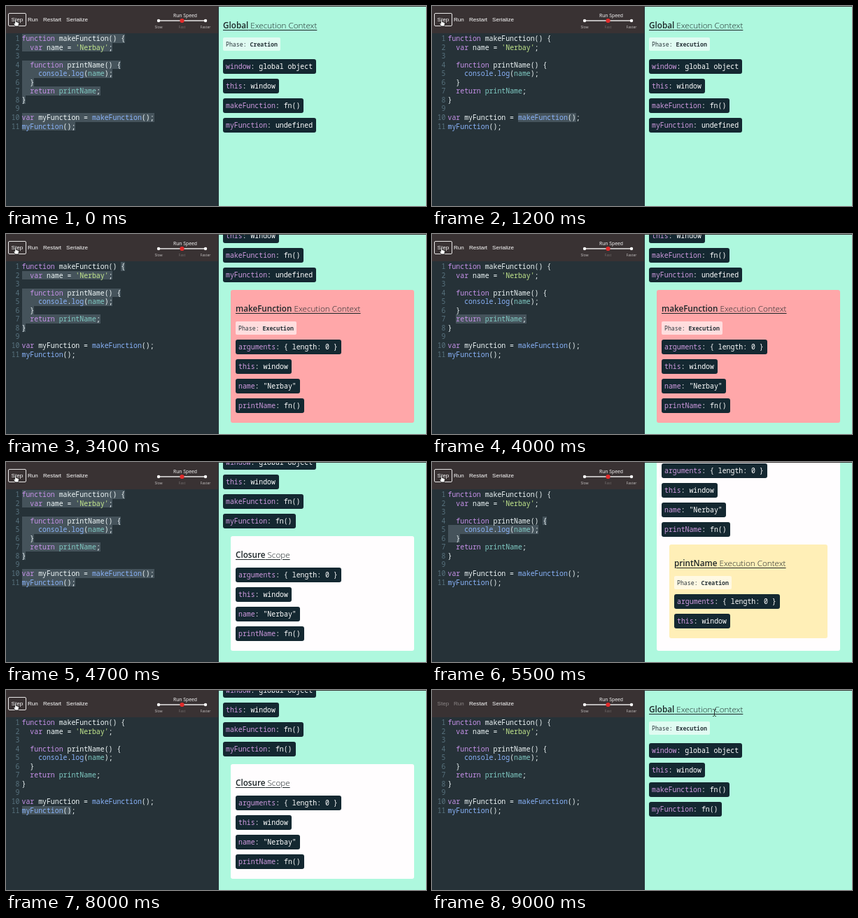
Animation, 600 px wide and 286 px high, one loop 9100 ms. Source, as an HTML page:

```html
<!DOCTYPE html>
<html lang="en">
<head>
<meta charset="utf-8">
<title>Closure visualizer</title>
<style>
html, body { margin: 0; width: 100%; height: 100%; overflow: hidden; }
#stage { position: relative; width: 600px; height: 286px; overflow: hidden; background: #263238; }
#stage div, #stage svg { position: absolute; }
#bar { left: 0; top: 0; width: 303px; height: 39px; background: #393233; color: #fff; font: 8.1px/18px "Liberation Sans", Arial, sans-serif; }
#bar span { position: absolute; top: 10.5px; white-space: nowrap; }
#ring { left: 3px; top: 10px; width: 24px; height: 17px; border: 1px solid #e8e6e6; border-radius: 2px; }
.done #ring { display: none; }
.done .off { color: #8b8686; }
#bar svg { left: 200px; top: 0; }
#code { left: 0; top: 40px; width: 303px; height: 245px; font: 500 9.86px/12.55px "Noto Sans Mono", "DejaVu Sans Mono", monospace; color: #eef6f7; }
#code .line, #code .num { white-space: pre; height: 12.55px; }
#code .line { left: 22.5px; }
#code .num { right: 283.5px; color: #58727e; }
#marks { left: 22.5px; top: 0; }
#marks div { height: 12.6px; background: #45535b; }
.k { color: #c792ea; } .s { color: #c3e88d; } .f { color: #8ab4fb; } .v { color: #80cbc4; }
#view { left: 303px; top: 0; width: 298px; height: 286px; overflow: hidden; background: #aef8de; clip-path: inset(0 0 0 1px); }
#edge { left: 303px; top: 0; width: 297px; height: 1px; background: #3a3535; }
#view section { display: flow-root; position: relative; padding-bottom: 7.5px; border-radius: 3px; }
#view section.open { padding-bottom: 0; }
#view section section { margin: 11.5px 18px 18px; }
#view .global > section { margin-bottom: 16px; }
#view h1, #view p { position: relative; margin: 0 0 7px 7px; width: max-content; white-space: pre; }
h1 { font: 300 11.7px/21px "Open Sans", "Noto Sans", sans-serif; color: #1c2628; text-decoration: underline; text-decoration-thickness: 1px; text-underline-offset: 2px; }
#view h1 { margin-top: 16px; margin-bottom: 7.5px; }
h1 b { font-weight: 600; }
p { font: 500 9.86px/21px "Noto Sans Mono", "DejaVu Sans Mono", monospace; color: #fff; background: #142831; border-radius: 3px; padding: 0 5px 0 4px; }
p i { font-style: normal; color: #cf9ae0; }
#view p.phase { font-size: 8.22px; line-height: 19px; padding: 0 4px; color: #28343a; background: rgba(255, 255, 255, .62); border-radius: 2px; }
#view .global > h1 { margin-top: 16.5px; }
#view .global > .phase { margin-bottom: 11.5px; }
.make { background: #ffa7a9; }
.closure { background: #fffdfe; }
.print { background: #ffefb7; }
#hand, #beam { left: 0; top: 0; }
</style>
</head>
<body>
<div id="stage">
  <div id="bar">
    <div id="ring"></div>
    <span class="off" style="left:7.5px">Step</span>
    <span class="off" style="left:31px">Run</span>
    <span style="left:53px">Restart</span>
    <span style="left:86px">Serialize</span>
    <svg width="103" height="39" font-family="Open Sans, sans-serif" text-anchor="middle">
      <text x="56" y="15.6" font-size="6.8" font-weight="500" fill="#fff">Run Speed</text>
      <path d="M18 21H85" stroke="#e9e6e6" stroke-width="1.5"/>
      <circle cx="18" cy="21" r="2.2" fill="#fff"/>
      <circle cx="85" cy="21" r="2.2" fill="#fff"/>
      <circle cx="51.5" cy="21" r="3.1" fill="#e02b2b"/>
      <g font-size="5.2" fill="#c4c0c0">
        <text x="18" y="32">Slow</text>
        <text x="51.5" y="32" fill="#746e6e">Fast</text>
        <text x="85" y="32">Faster</text>
      </g>
    </svg>
  </div>
  <div id="code"><div id="marks"></div></div>
  <div id="view"></div>
  <div id="edge"></div>
  <svg id="hand" width="30" height="40">
    <path d="M12.6 25V19.3q.9-1.2 1.8 0V22.6l3.2.8q.9.3.8 1.3l-.6 4.2H13.4L10.8 25.6q.2-1.2 1.8-.6z" fill="#fff" stroke="#111" stroke-width=".7"/>
  </svg>
  <svg id="beam" width="10" height="14">
    <path d="M2.5 1.5Q4.5 1.5 5 2.5Q5.5 1.5 7.5 1.5M5 2.5V10.5M2.5 11.5Q4.5 11.5 5 10.5Q5.5 11.5 7.5 11.5" fill="none" stroke="#222" stroke-width=".9"/>
  </svg>
</div>
<script>
const LOOP = 9100;
const $ = id => document.getElementById(id);
const NAME = 'Nerbay';

// Token prefix: ~k keyword, ~s string, ~f global, ~v local; | ends a token.
const source = [
  '~kfunction| makeFunction() {',
  `  ~kvar| name = ~s'${NAME}'|;`,
  '',
  '  ~kfunction| printName() {',
  '    ~fconsole|.~flog|(~vname|);',
  '  }',
  '  ~kreturn| ~vprintName|;',
  '}',
  '',
  '~kvar| myFunction = ~fmakeFunction|();',
  '~fmyFunction|();'
];
const plain = source.map(s => s.replace(/~[ksfv]|\|/g, ''));

source.forEach((s, i) => {
  const top = `style="top:${(i * 12.55).toFixed(2)}px"`;
  const html = s.replace(/~([ksfv])([^|]*)\|/g, '<span class="$1">$2</span>');
  $('code').insertAdjacentHTML('beforeend',
    `<div class="num" ${top}>${i + 1}</div><div class="line" ${top}>${html}</div>`);
});

// Highlight ranges: first line, column, last line, column.
const within = (line, text) => {
  const col = plain[line].indexOf(text);
  return [line, col, line, col + text.length];
};
const program = [0, 0, 10, plain[10].length];
const makeBody = [0, plain[0].indexOf('{'), 7, 1];
const printBody = [3, plain[3].indexOf('{'), 5, 3];
const declare = within(9, plain[9]);
const makeCall = within(9, 'makeFunction()');
const nameDecl = within(1, plain[1].trim());
const giveBack = within(6, plain[6].trim());
const myCall = within(10, 'myFunction()');
const logCall = within(4, 'console.log(name)');

const steps = [
  [0, program], [600, declare], [900, makeCall], [1300, within(9, 'makeFunction')],
  [1700, makeCall], [2100, makeBody], [2600, nameDecl], [2800, within(1, `'${NAME}'`)],
  [3000, nameDecl], [3300, makeBody], [3600, giveBack], [3800, within(6, 'printName')],
  [4000, giveBack], [4200, makeCall], [4400, declare], [4600, program],
  [4900, within(10, plain[10])], [5100, myCall], [5300, within(10, 'myFunction')],
  [5500, printBody], [6200, within(4, 'console.log(name);')], [6500, logCall],
  [6800, within(4, 'console.log')], [7100, within(4, 'console')], [7300, within(4, 'log')],
  [7500, within(4, 'name')], [7700, logCall], [7900, myCall], [8200, program], [8500, null]
];

function mark(range) {
  let html = '';
  if (range) {
    const [a, from, b, to] = range;
    for (let i = a; i <= b; i++) {
      const start = i === a ? from : 0;
      const end = i === b ? to : plain[i].length;
      html += `<div style="top:${(i * 12.55).toFixed(2)}px;left:${start}ch;width:${end - start}ch"></div>`;
    }
  }
  $('marks').innerHTML = html;
}

function box(kind, name, phase, rows, child = '') {
  const title = `<h1><b>${name}</b> ${phase ? 'Execution Context' : 'Scope'}</h1>`;
  const state = phase ? `<p class="phase">Phase: <b>${phase}</b></p>` : '';
  const list = Object.entries(rows).map(([k, v]) => `<p><i>${k}</i>: ${v}</p>`).join('');
  return `<section class="${kind}${child ? ' open' : ''}">${title}${state}${list}${child}</section>`;
}

const phaseAt = (t, start) => t < start ? 'Creation' : 'Execution';

function contexts(t) {
  let inner = '';
  if (t >= 5500 && t < 7900) {
    inner = box('print', 'printName', phaseAt(t, 5900), { arguments: '{ length: 0 }', this: 'window' });
  }
  let outer = '';
  if (t >= 2100 && t < 8400) {
    const live = t < 4200;
    outer = box(live ? 'make' : 'closure', live ? 'makeFunction' : 'Closure', live && phaseAt(t, 2400), {
      arguments: '{ length: 0 }', this: 'window',
      name: t < 3000 ? 'undefined' : `"${NAME}"`, printName: 'fn()'
    }, inner);
  }
  return box('global', 'Global', phaseAt(t, 300), {
    window: 'global object', this: 'window', makeFunction: 'fn()',
    myFunction: t < 4400 ? 'undefined' : 'fn()'
  }, outer);
}

let shownRange, shownView;
function draw() {
  const t = performance.now() % LOOP;
  const range = steps.filter(s => s[0] <= t).pop()[1];
  if (range !== shownRange) mark(shownRange = range);

  const html = contexts(t);
  if (html !== shownView) {
    $('view').innerHTML = shownView = html;
    $('view').scrollTop = 9999;
  }

  $('stage').classList.toggle('done', t >= 8500);
  const away = t >= 8900;
  $('hand').style.display = away ? 'none' : '';
  $('beam').style.display = away ? '' : 'none';
  $('beam').style.transform = t < 9000 ? 'translate(465px, 259px)' : 'translate(398.5px, 26px)';
  requestAnimationFrame(draw);
}
draw();
</script>
</body>
</html>
```
